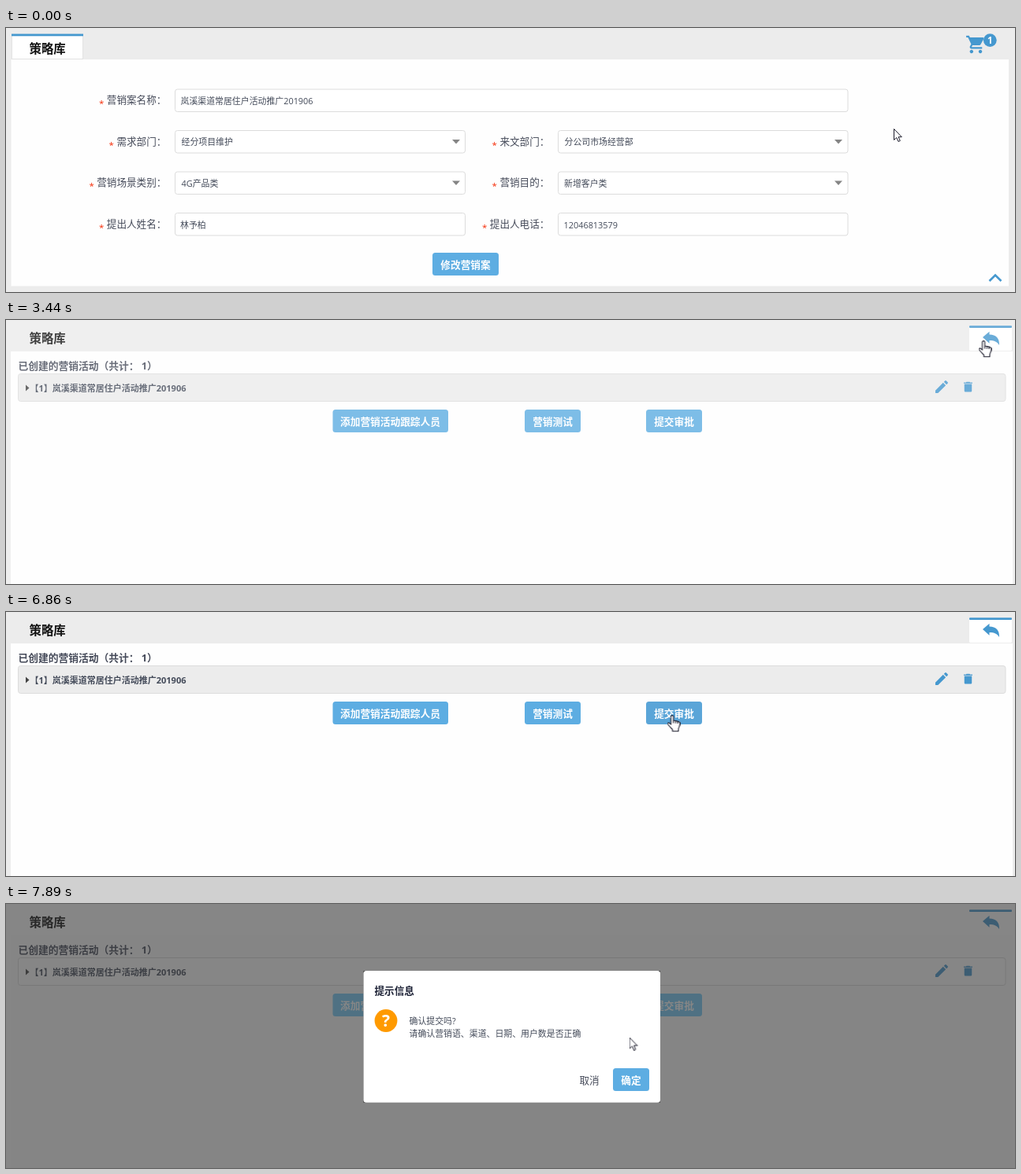
An HTML page that plays this animation: 1280 by 336 pixels, repeating every 8000 ms.

```html
<!DOCTYPE html>
<html lang="zh-CN">
<head>
<meta charset="utf-8">
<title>策略库</title>
<style>
html, body { margin: 0; width: 100%; height: 100%; overflow: hidden; background: #fff; }
svg { display: block; width: 100vw; height: 100vh; text-spacing-trim: space-all;
  font-family: "Open Sans", "Noto Sans CJK SC", "Noto Sans CJK", sans-serif; }

.title { font-size: 15.4px; font-weight: 700; fill: #111; }
.label { font-size: 12.6px; fill: #454a59; }
.end { text-anchor: end; }
.star { font-size: 11.5px; fill: #f5300c; }
.value { font-size: 10.9px; fill: #434a59; }
.bold { font-weight: 700; }
.head { font-size: 12.75px; }
.row { font-size: 11px; }
.btn { fill: #5dade2; }
.btn-text { font-size: 12.7px; font-weight: 700; fill: #fff; text-anchor: middle; }
.field { fill: #fff; stroke: #dcdcdc; }
.blue { fill: #4598cf; }
.shade { fill: #ececec; }
.line { stroke: #dcdcdc; }

/* 1% = 80 ms; every change is a hard step */
.anim { animation: 8s step-end infinite; }
#form { animation-name: form; }
#list { animation-name: list; }
.before { animation-name: before; }
.after { animation-name: after; }
.shade { animation-name: shade; }
.dim { animation-name: dim; }
#submit { animation-name: submit; }
#veil { animation-name: veil; }
#dialog { animation-name: dialog; transform-origin: 641.75px 169px; }
#pointer { animation-name: move; }
#arrow { animation-name: arrow; }
#hand { animation-name: hand; }

@keyframes form { 0% { opacity: 1 } 31.25%, 100% { opacity: 0 } }
@keyframes list {
  0% { opacity: 0 } 31.25% { opacity: .62 } 33.125% { opacity: 1 }
  41.5% { opacity: .6 } 43% { opacity: .8 } 44.5% { opacity: .92 } 46.375%, 100% { opacity: 1 }
}
@keyframes before { 0% { opacity: 1 } 41.5%, 100% { opacity: 0 } }
@keyframes after { 0% { opacity: 0 } 41.5%, 100% { opacity: 1 } }
@keyframes shade { 0% { fill: #ececec } 90.5%, 100% { fill: #fff } }
@keyframes dim { 0% { fill: #5dade2 } 89%, 100% { fill: #74ccf8 } }
@keyframes submit {
  0% { fill: #5dade2 } 73.375% { fill: #58a8de } 82.25% { fill: #5aa5d8 }
  89%, 100% { fill: #74ccf8 }
}
@keyframes veil {
  0% { opacity: 0 } 87.25% { opacity: .24 } 89% { opacity: .545 } 90.5%, 100% { opacity: .605 }
}
@keyframes dialog {
  0% { opacity: 0; transform: scale(.96) }
  87.25% { opacity: .55; transform: scale(.96) }
  89%, 100% { opacity: 1; transform: none }
}
@keyframes move {
  0% { transform: translate(1126px, 128px) }
  15.875% { transform: translate(1133px, 114px) }
  17.5% { transform: translate(1149px, 87px) }
  19.25% { transform: translate(1174px, 63px) }
  20.75% { transform: translate(1214px, 38px) }
  22.25% { transform: translate(1238.5px, 26px) }
  46.375% { transform: translate(1218px, 35px) }
  48% { transform: translate(1168px, 53px) }
  49.5% { transform: translate(1116px, 71px) }
  51.25% { transform: translate(984px, 144px) }
  52.875% { transform: translate(864px, 213px) }
  54.75% { transform: translate(862px, 214px) }
  56.25% { transform: translate(859.5px, 213px) }
  58.125% { transform: translate(830px, 211px) }
  61.625% { transform: translate(752px, 200px) }
  63.125% { transform: translate(663px, 181px) }
  65% { transform: translate(601px, 173px) }
  66.625% { transform: translate(559px, 166px) }
  68.375% { transform: translate(547px, 158px) }
  70% { transform: translate(627px, 144px) }
  71.875% { transform: translate(740px, 136px) }
  73.375% { transform: translate(843.5px, 131px) }
  97% { transform: translate(818px, 148px) }
  98.625%, 100% { transform: translate(790.5px, 169.5px) }
}
@keyframes arrow {
  0% { opacity: 1 } 26.125% { opacity: 0 } 46.375% { opacity: 1 }
  73.375% { opacity: 0 } 97%, 100% { opacity: 1 }
}
@keyframes hand {
  0% { opacity: 0 } 26.125% { opacity: 1 } 46.375% { opacity: 0 }
  73.375% { opacity: 1 } 97%, 100% { opacity: 0 }
}
</style>
</head>
<body>
<svg viewBox="0 0 1280 336">
  <defs>
    <path id="drop" d="M-5 -2.5H5L0 3Z" fill="#858585"/>
  </defs>

  <g id="form" class="anim">
    <rect width="1280" height="336" fill="#ececec"/>
    <rect x="6.5" y="40" width="1265.5" height="288.5" fill="#fefefe"/>
    <rect x="7.5" y="8.5" width="90" height="31" fill="#fff" stroke="#e2e2e2"/>
    <rect x="7" y="7.5" width="91" height="2.8" class="blue"/>
    <text x="29.5" y="32" class="title">策略库</text>

    <path class="blue" transform="translate(1217 7.5) scale(1.12)" d="M7 18c-1.1 0-1.99.9-1.99 2S5.9 22 7 22s2-.9 2-2-.9-2-2-2zM1 2v2h2l3.6 7.59-1.35 2.45c-.16.28-.25.61-.25.96 0 1.1.9 2 2 2h12v-2H7.42c-.14 0-.25-.11-.25-.25l.03-.12.9-1.63h7.45c.75 0 1.41-.41 1.75-1.03l3.58-6.49A1 1 0 0 0 20 4H5.21l-.94-2H1zm16 16c-1.1 0-1.99.9-1.99 2s.89 2 1.99 2 2-.9 2-2-.9-2-2-2z"/>
    <circle cx="1248.3" cy="15.6" r="8.4" class="blue"/>
    <text x="1248.3" y="19.8" class="btn-text" style="font-size:11.5px">1</text>

    <g class="field">
      <rect x="214.5" y="78" width="853.5" height="28.5" rx="3"/>
      <rect x="214.5" y="130.5" width="368" height="28.5" rx="3"/>
      <rect x="700.5" y="130.5" width="367.5" height="28.5" rx="3"/>
      <rect x="214.5" y="183" width="368" height="28.5" rx="3"/>
      <rect x="700.5" y="183" width="367.5" height="28.5" rx="3"/>
      <rect x="214.5" y="235.5" width="368" height="28.5" rx="3"/>
      <rect x="700.5" y="235.5" width="367.5" height="28.5" rx="3"/>
    </g>
    <use href="#drop" x="571" y="144.5"/>
    <use href="#drop" x="1056" y="144.5"/>
    <use href="#drop" x="571" y="197"/>
    <use href="#drop" x="1056" y="197"/>

    <g class="label end">
      <text x="203.4" y="96.2">营销案名称：</text>
      <text x="203.4" y="148.7">需求部门：</text>
      <text x="203.4" y="201.2">营销场景类别：</text>
      <text x="203.4" y="253.7">提出人姓名：</text>
      <text x="689.4" y="148.7">来文部门：</text>
      <text x="689.4" y="201.2">营销目的：</text>
      <text x="689.4" y="253.7">提出人电话：</text>
    </g>
    <g class="star">
      <text x="118" y="100">*</text>
      <text x="130.5" y="152.5">*</text>
      <text x="105.5" y="205">*</text>
      <text x="118" y="257.5">*</text>
      <text x="616.5" y="152.5">*</text>
      <text x="616.5" y="205">*</text>
      <text x="604" y="257.5">*</text>
    </g>
    <g class="value">
      <text x="221.5" y="97">岚溪渠道常居住户活动推广201906</text>
      <text x="222.5" y="149.3">经分项目维护</text>
      <text x="708.5" y="149.3">分公司市场经营部</text>
      <text x="222.5" y="202">4G产品类</text>
      <text x="708" y="202">新增客户类</text>
      <text x="221" y="254.5">林予柏</text>
      <text x="707.5" y="254.5">12046813579</text>
    </g>

    <rect x="541" y="286" width="84" height="29" rx="3.5" class="btn"/>
    <text x="583" y="305.6" class="btn-text">修改营销案</text>
    <path d="M1247.5 322L1255 314.5L1262.5 322" fill="none" stroke="#4598cf" stroke-width="2.6"/>
  </g>

  <g id="list" class="anim">
    <rect width="1280" height="336" class="shade anim"/>
    <rect x="6" y="40" width="1271" height="296" fill="#fefefe"/>
    <text x="29.5" y="29.3" class="title">策略库</text>
    <rect x="1222" y="8" width="54" height="31" rx="1.5" fill="#fff"/>
    <rect x="1222" y="7.3" width="54" height="2.8" rx="1" class="blue"/>
    <path class="blue" d="M1239 22L1247.5 14.7V18.6C1256 18.8 1260.5 23.5 1260 32C1257.5 27.8 1254 26 1247.5 26V29.8Z"/>

    <g class="before anim">
      <text x="15.5" y="63.4" class="label bold head">已创建的营销活动（共计： 0）</text>
      <path d="M15.5 69H1268" class="line" stroke-width="1.6"/>
    </g>

    <g class="after anim">
      <text x="15.5" y="63.4" class="label bold head">已创建的营销活动（共计： 1）</text>
      <rect x="15.5" y="68.5" width="1252.5" height="35" rx="3" class="shade line anim"/>
      <path d="M25 82.5L29.5 86.5L25 90.5Z" fill="#444"/>
      <text x="30.5" y="91.3" class="value bold row">【1】岚溪渠道常居住户活动推广201906</text>
      <path class="blue" transform="translate(1176.3 74.3) scale(.89)" d="M3 17.25V21h3.75L17.81 9.94l-3.75-3.75L3 17.25zM20.71 7.04c.39-.39.39-1.02 0-1.41l-2.34-2.34c-.39-.39-1.02-.39-1.41 0l-1.83 1.83 3.75 3.75 1.83-1.83z"/>
      <path class="blue" transform="translate(1211 76.5) scale(.79 .72)" d="M6 19c0 1.1.9 2 2 2h8c1.1 0 2-.9 2-2V7H6v12zM19 4h-3.5l-1-1h-5l-1 1H5v2h14V4z"/>

      <rect x="414.5" y="114" width="146.5" height="29" rx="3.5" class="btn dim anim"/>
      <text x="487.5" y="133.6" class="btn-text">添加营销活动跟踪人员</text>
      <rect x="658" y="114" width="71" height="29" rx="3.5" class="btn dim anim"/>
      <text x="693.5" y="133.6" class="btn-text">营销测试</text>
      <rect x="812" y="114" width="71" height="29" rx="3.5" id="submit" class="btn anim"/>
      <text x="847.5" y="133.6" class="btn-text">提交审批</text>
    </g>
  </g>

  <rect id="veil" class="anim" width="1280" height="336" fill="#373737"/>

  <g id="dialog" class="anim">
    <rect x="453.5" y="85" width="376.5" height="167.7" fill="#333"/>
    <rect x="453.5" y="85" width="376.5" height="167.7" rx="3.5" fill="#fff"/>
    <text x="467.5" y="114.5" class="label bold" style="fill:#1d2236">提示信息</text>
    <circle cx="482" cy="148.5" r="14.4" fill="#ff9a00"/>
    <text x="482" y="156" class="btn-text" style="font-size:21px">?</text>
    <text x="511.5" y="153.2" class="value">确认提交吗?</text>
    <text x="511.5" y="169.4" class="value">请确认营销语、渠道、日期、用户数是否正确</text>
    <text x="727.5" y="229.2" class="label">取消</text>
    <rect x="770" y="209" width="46" height="29" rx="3.5" class="btn"/>
    <text x="793" y="229.2" class="btn-text">确定</text>
  </g>

  <g id="pointer" class="anim" fill="#fff" stroke="#1b1b2b" stroke-linejoin="round">
    <path id="arrow" class="anim" d="M.5 .5V14.5L3.8 11.5L6 16.5L8.3 15.5L6.1 10.7H10.3Z"/>
    <g id="hand" class="anim" transform="translate(-5 0)" stroke-width="1.1">
      <path d="M5 2.2a1.6 1.6 0 0 1 3.2 0V7l2.8 .5 2.6 .6 1.5 .6c.9 .4 1.3 1.1 1.3 2.2 0 3.4-1.6 5-1.9 7.2v2.6H7v-2.2C5 16.5 2.5 14 1 11.8c-.8-1.4 .9-2.5 2.1-1.4L5 12.2Z"/>
      <path d="M8.2 7v3.4M11 7.5v3.2M13.6 8.1v3" fill="none"/>
    </g>
  </g>
</svg>
</body>
</html>
```
